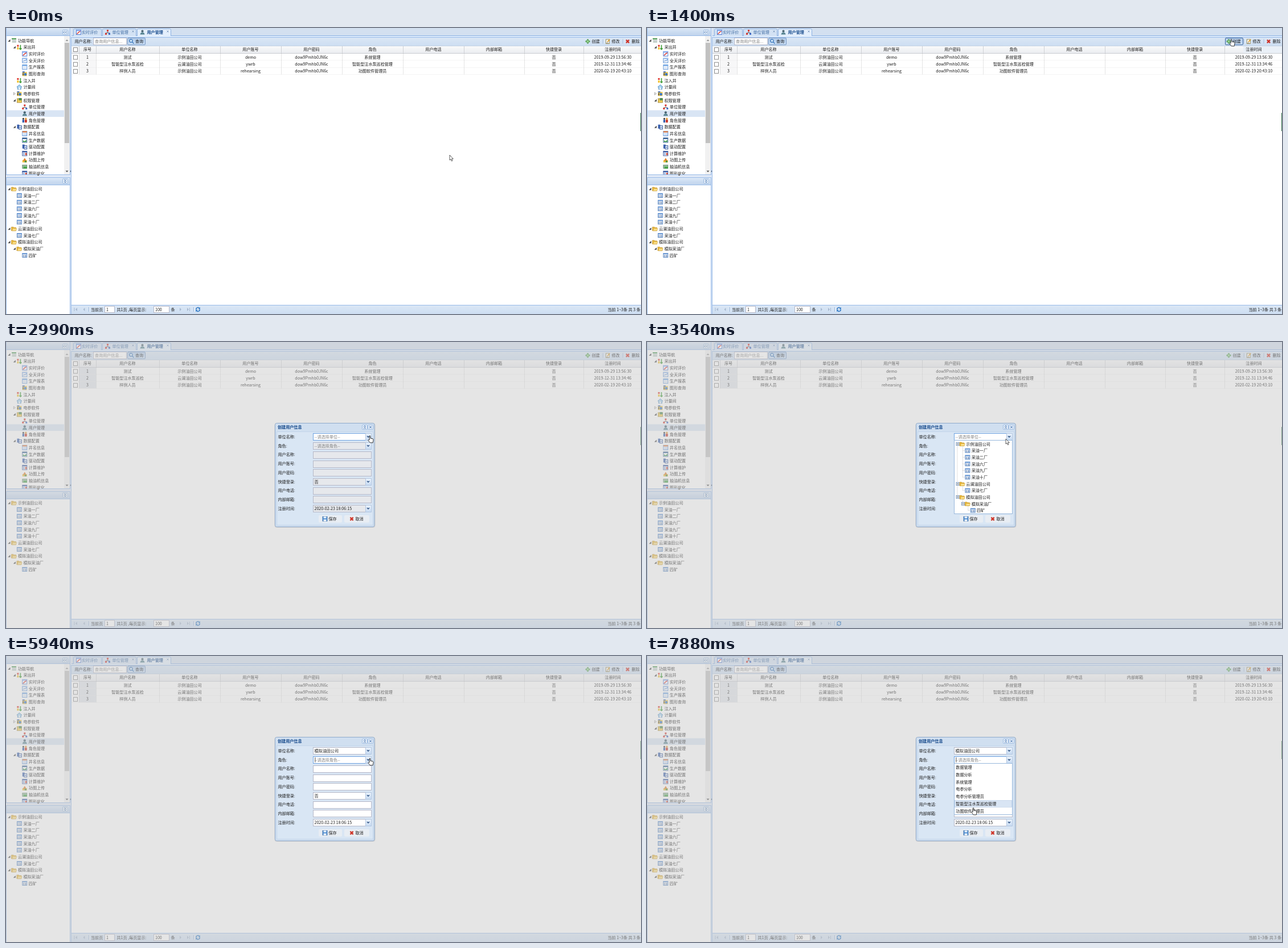
An HTML page that plays this animation: 1115 px wide and 502 px high, repeating every 8 s.

```html
<!DOCTYPE html>
<html>
<head>
<meta charset="utf-8">
<title>用户管理</title>
<style>
html, body { margin: 0; width: 100%; height: 100%; overflow: hidden; background: #fff; }
svg { display: block; width: 1115px; height: 502px; }
text { font: 7.1px "Noto Sans CJK SC", "Noto Sans", sans-serif; fill: #1c1c1c; white-space: pre; }
.b { font-weight: 700; fill: #15498b; }
.tab { fill: #416da3; }
.g { fill: #808080; }
.m { text-anchor: middle; }
.e { text-anchor: end; }
</style>
</head>
<body>
<svg id="stage" viewBox="0 0 1115 502">
  <defs>
    <linearGradient id="bar" x2="0" y2="1"><stop stop-color="#dde9f7"/><stop offset=".5" stop-color="#cbdcf1"/><stop offset="1" stop-color="#bfd3ec"/></linearGradient>
    <linearGradient id="tool" x2="0" y2="1"><stop stop-color="#dbe7f5"/><stop offset="1" stop-color="#cddef2"/></linearGradient>
    <linearGradient id="head" x2="0" y2="1"><stop stop-color="#fbfbfb"/><stop offset="1" stop-color="#ebedf1"/></linearGradient>
    <linearGradient id="press" x2="0" y2="1"><stop stop-color="#b2cbe9"/><stop offset="1" stop-color="#c9def6"/></linearGradient>
    <linearGradient id="trig" x2="0" y2="1"><stop stop-color="#edf4fc"/><stop offset="1" stop-color="#c6daf2"/></linearGradient>
    <clipPath id="nav"><rect x="1" y="14" width="101" height="243"/></clipPath>
  </defs>
</svg>
<script>
const stage = document.getElementById('stage');
const LOOP = 8000, ROW = 11.66;

const text = (x, y, s, cls = '') => `<text x="${x}" y="${y + 2.6}" class="${cls}">${s}</text>`;
const rect = (x, y, w, h, fill, extra = '') => `<rect x="${x}" y="${y}" width="${w}" height="${h}" fill="${fill}" ${extra}/>`;
const box = (x, y, w, h, fill, stroke, extra = '') => rect(x + .5, y + .5, w - 1, h - 1, fill, `stroke="${stroke}" ${extra}`);
const path = (d, fill, stroke = 'none', w = 1) => `<path d="${d}" fill="${fill}" stroke="${stroke}" stroke-width="${w}"/>`;
const at = (x, y, s) => `<g transform="translate(${x} ${y})">${s}</g>`;
const group = (id, s) => `<g id="${id}">${s}</g>`;
const dot = (x, y, r, fill) => `<circle cx="${x}" cy="${y}" r="${r}" fill="${fill}"/>`;

// Icons are about 9px wide, centred on the origin.
const panel = (stroke, head) => rect(-4, -4, 8, 8, '#fff', `stroke="${stroke}" stroke-width=".9"`) + rect(-4, -4, 8, 2, head);
const ICON = {
  menu: rect(-4, -4, 8, 8, '#e8efe8') + rect(-4, -4, 8, 2, '#4d9a55') + path('M-3 0H4M-3 2.5H4', 'none', '#9aa', 1),
  bars: rect(-4, -4, 3, 3, '#e0392b') + rect(-4, 0, 3, 4, '#f2c230') + path('M2 -4V4M0 2L2 4L4 2', 'none', '#3d9b35', 1.6),
  chart: panel('#3c6fd0', '#8fb2f0') + path('M-3 3L0 0L3 -2', 'none', '#d8322a', 1.4),
  trend: panel('#4a84cf', '#a9c8f2') + path('M-3 2L-1 0L1 1L3 -2', 'none', '#3b78c8', 1),
  sheet: panel('#5a93d8', '#6fa5e4') + path('M-3 0H3M-3 2H3', 'none', '#b7cfee', .8),
  query: rect(-4, -3, 8, 7, '#f0c644') + rect(-4, -4, 4, 2, '#3a62a8') + dot(1, 1, 2.4, '#3a78c9') + path('M-3 -1V3', 'none', '#333', 1.3),
  house: path('M-4.5 0L0 -4L4.5 0H3V4H-3V0Z', '#a9d3f0', '#4a88bd', .8) + rect(-1, 1, 2, 3, '#fff'),
  org: path('M0 -1V1M-3 3V1H3V3', 'none', '#555', .8) + rect(-1.5, -4.3, 3, 3, '#d8342b') + rect(-4.5, 1.3, 3, 3, '#d8342b') + rect(1.5, 1.3, 3, 3, '#3a68c8'),
  lock: rect(-4, -3, 8, 7, '#efcb58', 'stroke="#957a2a" stroke-width=".7"') + rect(-1, -4, 5, 4, '#4f8b53'),
  user: path('M-4 4Q-3.5 0 0 0Q3.5 0 4 4Z', '#5b8794') + dot(0, -2, 2.1, '#4a6572'),
  users: rect(-4, -1, 3, 5, '#2554a8') + rect(0, -1, 4, 5, '#c8372d') + dot(-2.4, -2.6, 1.5, '#333') + dot(2, -2.6, 1.7, '#e39a35'),
  data: rect(-4, -4, 4, 7, '#3b62b0') + rect(-1, -2, 5, 6, '#e3ecfa', 'stroke="#274a92" stroke-width=".9"') + path('M0 1H3', 'none', '#3b62b0', 1),
  grid: panel('#4b86d6', '#e4702c') + path('M-1 -2V4M2 -2V4', 'none', '#71a0df', .9),
  wave: panel('#2c5a91', '#315d94') + path('M-3 3V0L0 2L3 -1V3Z', '#3b9a4c'),
  calc: panel('#3355a0', '#3355a0') + rect(-3, -1, 3, 4, '#9fb7df') + rect(1, -1, 2.5, 4, '#d5442e'),
  up: rect(-4, 0, 8, 4, '#e9bd3b') + path('M-3 1L0 -4L3 1Z', '#e2812b') + rect(0, 1, 3, 3, '#46914a'),
  pump: rect(-4, -3, 8, 6, '#94b99a', 'stroke="#5a7f62" stroke-width=".7"') + rect(-2, 0, 6, 3, '#40a442'),
  unit: rect(-4, -3.5, 8, 7, '#fff', 'stroke="#4a7ec0" stroke-width=".9"') + rect(-4, -3.5, 8, 1.7, '#6d9cd8') + path('M-3 0H-1M-3 2H-1M0 0H3M0 2H3', 'none', '#39639f', 1),
  folder: path('M-4.5 -3H-1L0 -2H3.5V3.5H-4.5Z', '#e8b83c', '#b98a24', .6) + path('M-3.5 3.5L-2 -.5H4.8L3.5 3.5Z', '#fbe08a', '#c89a2e', .5),
  find: dot(-1, -1, 2.6, '#d7ebfb') + path('M1 1L4 4M1.6 -1A2.6 2.6 0 1 1 -3.6 -1A2.6 2.6 0 1 1 1.6 -1', 'none', '#3573b9', 1.2),
  add: path('M-1 -3.5H1V-1H3.5V1H1V3.5H-1V1H-3.5V-1H-1Z', '#a9dba0', '#3f8f3b', .9),
  edit: rect(-3.5, -3.5, 6, 7.5, '#fff', 'stroke="#8a7a3a" stroke-width=".8"') + path('M-1 1L3 -3.5', 'none', '#d99a25', 1.8) + path('M-2.5 2.5H1', 'none', '#555', .8),
  del: path('M-2.6 -2.6L2.6 2.6M2.6 -2.6L-2.6 2.6', 'none', '#cf3327', 2.2),
  save: rect(-4, -4, 8, 8, '#4b8bd0', 'stroke="#2c61a0" stroke-width=".7"') + rect(-2.5, -4, 5, 3, '#e8f2fc') + rect(-2.5, 1, 5, 3, '#fff'),
  fresh: path('M-3.2 0A3.2 3.2 0 0 1 2.6 -2M3.2 0A3.2 3.2 0 0 1 -2.6 2', 'none', '#2f78c4', 1.5) + path('M3.8 -4V-.6H.6ZM-3.8 4V.6H-.6Z', '#2f78c4')
};
const icon = (k, x, y) => at(x, y, ICON[k]);

const tree = (rows, x0, y0) => rows.map(([lv, k, label, ex], i) => {
  const y = y0 + i * ROW, x = x0 + lv * 9.4;
  const mark = ex === 2 ? path(`M${x + 3 - 9} ${y - 2.2}L${x - 3} ${y}L${x - 6} ${y + 2.2}Z`, '#fff', '#888', .7)
    : ex ? path(`M${x - 2.5} ${y - 2.2}V${y + 2}H${x - 6.7}Z`, '#444') : '';
  return mark + icon(k, x + 4, y) + text(x + 11, y, label);
}).join('');

const NAV = [
  [0, 'menu', '功能导航', 1], [1, 'bars', '采出井', 1], [2, 'chart', '实时评价'], [2, 'trend', '全天评价'],
  [2, 'sheet', '生产报表'], [2, 'query', '图形查询'], [1, 'bars', '注入井'], [1, 'house', '计量间'],
  [1, 'query', '电参软件', 2], [1, 'lock', '权限管理', 1], [2, 'org', '单位管理'], [2, 'user', '用户管理'],
  [2, 'users', '角色管理'], [1, 'data', '数据配置', 1], [2, 'grid', '井名信息'], [2, 'wave', '生产数据'],
  [2, 'data', '驱动配置'], [2, 'calc', '计算维护'], [2, 'up', '功图上传'], [2, 'pump', '抽油机信息'], [2, 'calc', '图形优化']
];
const UNITS = [
  [0, 'folder', '示例油田公司', 1], ...[...'一二六九十'].map(n => [1, 'unit', `采油${n}厂`]),
  [0, 'folder', '云澜油田公司', 1], [1, 'unit', '采油七厂'],
  [0, 'folder', '模拟油田公司', 1], [1, 'folder', '模拟采油厂', 1], [2, 'unit', '四矿']
];

const tinyBtn = (x, y, s) => box(x, y, 10, 9, '#e3edf9', '#9dbbe0', 'rx="1"') + path(s, 'none', '#3d6ca8', 1);
const chevUp = (x, y) => `M${x - 2} ${y}L${x} ${y - 2}L${x + 2} ${y}M${x - 2} ${y + 3}L${x} ${y + 1}L${x + 2} ${y + 3}`;
const chevDown = (x, y) => `M${x - 2} ${y - 2.5}L${x} ${y - .5}L${x + 2} ${y - 2.5}M${x - 2} ${y + .5}L${x} ${y + 2.5}L${x + 2} ${y + .5}`;

function sidebar() {
  return rect(0, 0, 115, 502, '#dfe8f6') + box(0, 0, 113, 258, '#fff', '#99bbe8') + box(0, 262, 113, 241, '#fff', '#99bbe8')
    + rect(1, 0, 111, 14, 'url(#bar)') + rect(1, 263, 111, 13, 'url(#bar)')
    + rect(1, 13, 111, 1, '#99bbe8') + rect(1, 275, 111, 1, '#99bbe8')
    + tinyBtn(99, 3, 'M103 5.5L101 7.5L103 9.5M106.5 5.5L104.5 7.5L106.5 9.5') + tinyBtn(99, 264, chevDown(104, 268.5))
    + rect(1, 144.4, 101, 11.6, '#d9e5f4')
    + `<g clip-path="url(#nav)">${tree(NAV, 10, 22)}</g>` + tree(UNITS, 10, 282.4)
    + rect(102, 14, 10, 243, '#f1f1f1') + rect(103, 26, 8, 176, '#c1c1c1')
    + path('M104.5 23L107 20L109.5 23Z', '#999') + path('M104.5 250.5L107 253L109.5 250.5Z', '#444')
    + path('M54 257H59L56.5 259.5Z', '#555') + path('M115 249V254L112.5 251.5Z', '#555');
}

function tabs() {
  const tab = (x, w, k, label, cls, close) =>
    path(`M${x + .5} 14V3.5Q${x + .5} 1.5 ${x + 2.5} 1.5H${x + w - 2.5}Q${x + w - .5} 1.5 ${x + w - .5} 3.5V14`, cls === 'b' ? '#e4effc' : '#d3e2f4', '#8db2e3')
    + icon(k, x + 9.5, 7.5) + text(x + (close ? 17.5 : 15), 7.5, label, cls)
    + (close ? path(`M${x + w - 7.5} 4.5l3 3m0 -3l-3 3`, 'none', '#7b98bd', .9) : '');
  return rect(115, 0, 1000, 16, '#d3e0f0') + rect(115, 13, 1000, 3, '#deecfd') + rect(115, 13, 1000, 1, '#8db2e3')
    + tab(118, 50, 'chart', '实时评价', 'tab') + tab(169, 60, 'org', '单位管理', 'tab', 1) + tab(230, 60, 'user', '用户管理', 'b', 1);
}

const sep = (x, y) => rect(x, y - 4, 1, 8, '#98b4d8') + rect(x + 1, y - 4, 1, 8, '#f4f8fd');

function toolbar() {
  return rect(115, 16, 1000, 15, 'url(#tool)') + rect(115, 16, 1000, 1, '#99bbe8')
    + text(120.5, 23.5, '用户名称:') + box(153, 17, 59, 13, '#fff', '#b5b8c8') + text(156, 23.5, '查询用户信息...', 'g')
    + box(213, 17, 32, 13, 'url(#press)', '#7a9ac4', 'rx="1.5"') + icon('find', 220.5, 23.5) + text(227, 23.5, '查询')
    + box(1015, 17, 32, 13, 'url(#press)', '#6d91c0', 'id="addBox" rx="1.5"')
    + icon('add', 1021.5, 23.5) + text(1028.5, 23.5, '创建') + sep(1048, 23.5)
    + icon('edit', 1057, 23.5) + text(1063.5, 23.5, '修改') + sep(1083, 23.5) + icon('del', 1091.5, 23.5) + text(1098.5, 23.5, '删除');
}

const EDGES = [115, 128, 158, 269, 376, 483, 590, 697, 804, 910, 1014, 1115];
const HEADS = ['序号', '用户名称', '单位名称', '用户账号', '用户密码', '角色', '用户电话', '内部邮箱', '快捷登录', '注册时间'];
const USERS = [
  ['1', '测试', '示例油田公司', 'demo', 'dow9Pmhb0JN6c', '系统管理', '', '', '否', '2019-09-29 13:56:30'],
  ['2', '智能型注水泵巡检', '云澜油田公司', 'ywrb', 'dow9Pmhb0JN6c', '智能型注水泵巡检管理', '', '', '否', '2019-12-31 13:34:46'],
  ['3', '样例人员', '示例油田公司', 'rehearsing', 'dow9Pmhb0JN6c', '功图软件管理员', '', '', '否', '2020-02-19 20:43:10']
];

function table() {
  const mid = i => i === 9 ? 1065.5 : (EDGES[i + 1] + EDGES[i + 2]) / 2;
  const cells = (list, y) => list.map((s, i) => text(mid(i), y, s, 'm')).join('');
  const check = y => box(118, y - 4, 8, 8, '#fff', '#8c8c8c');
  return rect(115, 31, 1000, 455, '#fff') + rect(115, 31, 1000, 13, 'url(#head)') + rect(1047, 32, 68, 12, '#eaf0f7', 'id="headHover"')
    + rect(128, 44, 30, 37.5, '#f7f7f8', 'id="numbers"') + rect(115, 44, 1000, 12.3, '#e9eef5', 'id="rowHover"')
    + rect(115, 31, 1000, 1, '#c5d3e4') + rect(115, 44, 1000, 1, '#c9ccd1')
    + rect(115, 56.5, 1000, .6, '#ededed') + rect(115, 69, 1000, .6, '#ededed') + rect(115, 81, 1000, .6, '#ededed')
    + EDGES.slice(1, -1).map(x => rect(x, 32, 1, 12, '#cfd1d5') + `<path d="M${x + .5} 45V81.5" stroke="#bbb" stroke-width=".8" stroke-dasharray="1 1"/>`).join('')
    + check(38) + cells(HEADS, 37.7)
    + USERS.map((u, i) => check(51.5 + i * 12.3) + cells(u, 51 + i * 12.3)).join('')
    + rect(114, 16, 1, 486, '#99bbe8');
}

function pager() {
  const y = 494, tri = (x, d) => path(`M${x} ${y - 3}L${x + 3 * d} ${y}L${x} ${y + 3}Z`, '#a9b9d0');
  const field = (x, w, s) => box(x, 488, w, 12, '#fff', '#b5b8c8') + text(x + 3, y, s);
  return rect(115, 486, 1000, 16, 'url(#tool)') + rect(115, 486, 1000, 1, '#99bbe8')
    + rect(119.5, y - 3, 1, 6, '#a9b9d0') + tri(125, -1) + tri(138.5, -1) + sep(145, y)
    + text(149, y, '当前页') + field(173, 18, '1') + text(194.5, y, '共1页 ,每页显示:') + field(259, 28, '100') + text(289.5, y, '条')
    + tri(305, 1) + tri(318, 1) + rect(322, y - 3, 1, 6, '#a9b9d0') + sep(329, y) + icon('fresh', 337, y)
    + text(1114, y, '当前 1~3条 共 3 条', 'e');
}

const LABELS = ['单位名称', '角色', '用户名称', '用户账号', '用户密码', '快捷登录', '用户电话', '内部邮箱', '注册时间'];
const VALUES = { 0: '--请选择单位--', 1: '--请选择角色--', 5: '否', 8: '2020-02-23 18:06:15' };
const fieldY = i => 166.3 + i * 15.74;

function dialog() {
  const field = (s, i) => {
    const y = Math.round(fieldY(i)) - 6, v = VALUES[i];
    return text(477.5, fieldY(i), s + ':') + box(539, y, 103, 13, '#e6e8ec', '#b5b8c8', 'class="field"')
      + (v ? box(631, y, 11, 13, 'url(#trig)', '#b3c6e0') + path(`M634 ${y + 5}L636 ${y + 7}L638 ${y + 5}`, 'none', '#2b4f80', 1.4) : '')
      + (v ? `<g id="v${i}">${text(541.5, fieldY(i), v, i < 2 ? 'g' : '')}</g>` : '');
  };
  return rect(471.5, 142.5, 177, 183.5, '#000', 'rx="4" opacity=".08"') + rect(472.5, 142.5, 174.5, 182, '#d0dff0', 'rx="3" stroke="#8faacb"')
    + box(475, 157, 170, 165, '#d9e6f4', '#c3d5ea')
    + text(477, 149.3, '创建用户信息', 'b') + tinyBtn(625, 145, chevUp(630, 149)) + tinyBtn(635, 145, 'M638 147.5L642 151.5M642 147.5L638 151.5')
    + LABELS.map(field).join('') + rect(542.5, 178, .8, 8.5, '#222', 'id="caret"')
    + rect(549, 304, 41, 13, '#e8edf3', 'rx="2"') + icon('save', 560, 310.5) + text(566.5, 310.5, '保存')
    + rect(594, 304, 44, 13, '#e8edf3', 'rx="2"') + icon('del', 607, 310.5) + text(613.5, 310.5, '取消');
}

function unitMenu() {
  const y0 = 179, line = d => `<path d="${d}" fill="none" stroke="#aaa" stroke-width=".7" stroke-dasharray="1 1"/>`;
  const rows = UNITS.map(([lv, k, s, ex], i) => {
    const y = y0 + i * ROW, x = 549.5 + lv * 9.4;
    return line(`M${x - 4.5} ${y}H${x}`)
      + (ex ? box(x - 7, Math.round(y) - 3, 6, 6, '#fff', '#7d98bd') + path(`M${x - 5.5} ${Math.round(y)}h3`, 'none', '#234', .9) : '')
      + icon(k, x + 4, y) + text(x + 10.8, y, s);
  }).join('');
  return box(539, 172, 103, 130, '#fff', '#98b8dc')
    + rect(540.5, 266.5, 100, 11.5, '#eee', 'id="picked" stroke="#777" stroke-width=".7" stroke-dasharray="1 1"')
    + line(`M545 182V${y0 + 8 * ROW}M554.4 182V${y0 + 5 * ROW}M554.4 252V${y0 + 7 * ROW}M554.4 276V287M563.8 288V${y0 + 10 * ROW}`) + rows;
}

const ROLES = ['数据管理', '数据分析', '系统管理', '电参分析', '电参分析管理员', '智能型注水泵巡检管理', '功图软件管理员'];
const roleMenu = () => box(539, 188, 103, 91, '#fff', '#98b8dc') + rect(540.5, 189.3, 100, 12, '#d9e5f4', 'id="roleHover" stroke="#b9cde6" stroke-width=".6"')
  + ROLES.map((s, i) => text(542.3, 195.3 + i * 12.8, s)).join('');

stage.innerHTML += sidebar() + tabs() + toolbar() + table() + pager()
  + rect(1114, 149, 1, 32, '#2f7048') + rect(0, 0, 1115, 502, '#ccc', 'id="mask" opacity=".5"')
  + group('dialog', dialog()) + group('unitMenu', unitMenu()) + group('roleMenu', roleMenu())
  + group('cursor',
    group('ring', '<circle cx="2" cy="3" r="5.8" fill="none" stroke="#555" stroke-width=".9"/>')
    + group('arrow', path('M0 0V9L2 7.2L3.5 10.6L5 9.9L3.6 6.7H6.3Z', '#fff', '#333', .8))
    + group('hand', path('M-.9 7V1.2Q0 -.2 .9 1.2V5L5 5.8Q6.3 6.2 6 8L5.2 12.8H.2L-3.2 8.4Q-2.6 6.6 -.9 8Z', '#fff', '#222', .9)));

const el = {};
stage.querySelectorAll('[id]').forEach(n => el[n.id] = n);
const fields = [...stage.querySelectorAll('.field')];
const show = (id, on) => el[id].setAttribute('visibility', on ? 'inherit' : 'hidden');

// start, end, steps, then from, bend and to points
const MOVES = [
  [270, 940, 6, 779, 223, 900, 110, 1025, 19],
  [1250, 1400, 2, 1025, 19, 1026, 19, 1026, 19],
  [2060, 2990, 8, 1026, 19, 800, 110, 639, 164],
  [3420, 4390, 8, 639, 164, 530, 235, 597, 269],
  [4820, 5280, 4, 597, 269, 630, 225, 642, 180],
  [5550, 5940, 4, 642, 180, 641, 179, 639, 179],
  [6800, 7760, 8, 639, 179, 570, 215, 573, 264],
  [7880, 7880, 1, 573, 264, 573, 265, 573, 266]
];

function pointer(t) {
  const m = MOVES.filter(v => t >= v[0]).pop();
  if (!m) return [MOVES[0][3], MOVES[0][4]];
  const [a, b, n, x0, y0, cx, cy, x1, y1] = m;
  const k = n > 1 ? Math.min(n, Math.floor((t - a) / (b - a) * (n - 1) + 1e-6) + 1) / n : 1;
  const e = k * k * (3 - 2 * k), q = (p, c, r) => (1 - e) * (1 - e) * p + 2 * e * (1 - e) * c + e * e * r;
  return [q(x0, cx, x1), q(y0, cy, y1)];
}

let picked = null;
function draw(t) {
  const [x, y] = pointer(t), open = t >= 1650;
  el.cursor.setAttribute('transform', `translate(${x.toFixed(1)} ${y.toFixed(1)})`);
  const hand = t >= 940 && !open || t >= 2855 && t < 3420 || t >= 5150;
  show('hand', hand);
  show('arrow', !hand);
  show('ring', t >= 4550 && t < 4700);

  show('addBox', t >= 940 && !open);
  el.addBox.setAttribute('stroke', t >= 1400 ? '#41699f' : '#8fb0da');
  const over = !open && y >= 44 && y < 81;
  show('rowHover', over);
  if (over) el.rowHover.setAttribute('y', 44.5 + Math.floor((y - 44) / 12.35) * 12.3);
  show('headHover', t >= 800 && !open);
  el.numbers.setAttribute('fill', open ? '#e2e6ec' : '#f7f7f8');

  show('mask', open);
  show('dialog', open);
  show('unitMenu', t >= 3150 && t < 4700);
  show('picked', t >= 4550 && t < 4700);
  show('roleMenu', t >= 6090);
  show('roleHover', t >= 6800 && y >= 189);
  el.roleHover.setAttribute('y', 189.3 + 12.8 * Math.max(0, Math.min(5, Math.floor((y - 189) / 12.8))));

  const focus = t >= 5810 ? 1 : t >= 2855 && t < 5550 ? 0 : -1;
  fields.forEach((f, i) => {
    f.setAttribute('fill', t >= (i ? 3150 : 2855) ? '#fff' : '#e6e8ec');
    f.setAttribute('stroke', i === focus ? '#6fa3e0' : '#b5b8c8');
  });
  show('caret', t >= 5810);
  const done = t >= 4700;
  if (done !== picked) {
    picked = done;
    el.v0.innerHTML = done ? text(541.5, fieldY(0), '模拟油田公司') : text(541.5, fieldY(0), VALUES[0], 'g');
  }
}

// Menus carry their own visibility, so hidden groups keep their rows hidden too.
function tick() {
  draw(performance.now() % LOOP);
  requestAnimationFrame(tick);
}
tick();
</script>
</body>
</html>
```
